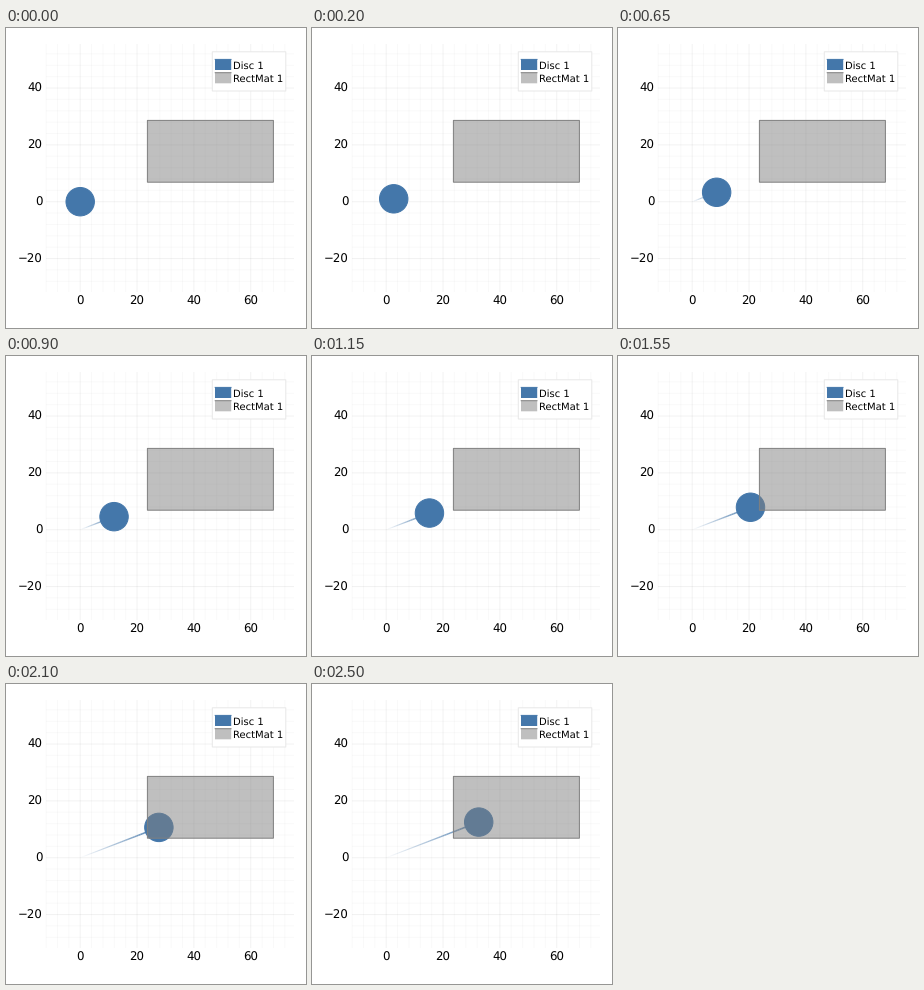
A matplotlib script for the animation above (2.55 s loop, 300 px wide and 300 px high).

```python
import numpy as np
import matplotlib.pyplot as plt
from matplotlib.animation import FuncAnimation
from matplotlib.collections import LineCollection
from matplotlib.colors import to_rgba
from matplotlib.patches import Circle, Rectangle

SIZE, DPI = 300, 100
FRAMES, INTERVAL = 51, 50
PT = 72 / DPI                      # points per pixel
SCALE, X0, Y0 = 2.842, 74.2, 173.7  # pixels per unit, screen origin
LEFT, RIGHT, TOP, BOTTOM = 40, 288, 16, 264
BLUE, GRAY = "#4477aa", "#808080"

plt.rcParams["font.family"] = "DejaVu Sans"
plt.rcParams["text.hinting"] = "none"
fig = plt.figure(figsize=(SIZE / DPI, SIZE / DPI), dpi=DPI, facecolor="white")
ax = fig.add_axes([0, 0, 1, 1])
ax.set_xlim(0, SIZE)
ax.set_ylim(SIZE, 0)
ax.axis("off")


def px(x):
    return X0 + SCALE * x


def py(y):
    return Y0 - SCALE * y


def label(x, y, text, size, ha):
    """Text whose capitals are centred on y."""
    ax.text(x, y + 0.365 * size, text, fontsize=size * PT, ha=ha,
            va="baseline", color="black", zorder=8)


def line(xs, ys, color, alpha=1, z=0):
    ax.plot(xs, ys, color=color, alpha=alpha, lw=PT, zorder=z,
            solid_capstyle="butt", snap=False)


def box(left, top, right, bottom, z, **style):
    ax.add_patch(Rectangle((left, top), right - left, bottom - top,
                           lw=PT, zorder=z, snap=False, **style))


def position(n):
    """Steady glide that slows once the disc centre is on the mat."""
    n = np.asarray(n, dtype=float)
    drag = 0.0076 * np.maximum(n - 36, 0) ** 2
    dx = 1.88 * n - drag
    return X0 + dx, Y0 - 0.385 * dx


# Grid and tick labels
for v in range(-12, 76, 4):
    line([px(v)] * 2, [TOP, BOTTOM], "black", 0.05 if v % 20 == 0 else 0.025)
for v in range(-28, 56, 4):
    line([LEFT, RIGHT], [py(v)] * 2, "black", 0.05 if v % 20 == 0 else 0.025)
for v in range(0, 61, 20):
    label(px(v), 273, str(v), 11.8, "center")
for v in range(-20, 41, 20):
    label(36.3, py(v), str(v).replace("-", "\u2212"), 11.8, "right")

# Mat lies over the disc and its trail
mat = (141.4, 92.4, 267.4, 154.2)
box(*mat, z=4, fc=GRAY, ec="none", alpha=0.5)
box(*mat, z=5, fill=False, ec=GRAY)

# Legend
box(206.3, 23.8, 279.8, 63, z=6, fc="white", ec="#e8e8e8")
for y, text, color, alpha in ((36.7, "Disc 1", BLUE, 1),
                              (50, "RectMat 1", GRAY, 0.5)):
    box(209, y - 5.3, 225.2, y + 5.3, z=7, fc=color, ec="none", alpha=alpha)
    line([208.7, 225.5], [y - 5.3] * 2, color, z=8)
    label(226.6, y + 0.3, text, 10, "left")

# Moving parts
points = np.column_stack(position(np.arange(FRAMES)))
segments = np.stack([points[:-1], points[1:]], axis=1)

trail = LineCollection([], zorder=2, capstyle="butt")
ax.add_collection(trail, autolim=False)
disc = Circle((X0, Y0), 5 * SCALE, fc=BLUE, ec=BLUE, lw=PT, zorder=3)
ax.add_patch(disc)


def update(n):
    # The trail fades and thins from the disc back to the start
    ramp = (np.arange(n) + 0.5) / max(n, 1)
    trail.set_segments(segments[:n])
    trail.set_color([to_rgba(BLUE, u) for u in ramp])
    trail.set_linewidth((0.8 + ramp) * PT if n else [0])
    disc.center = points[n]
    return trail, disc


anim = FuncAnimation(fig, update, frames=FRAMES, interval=INTERVAL,
                     init_func=lambda: update(0), repeat=True,
                     repeat_delay=0, blit=False)
plt.show()
```
